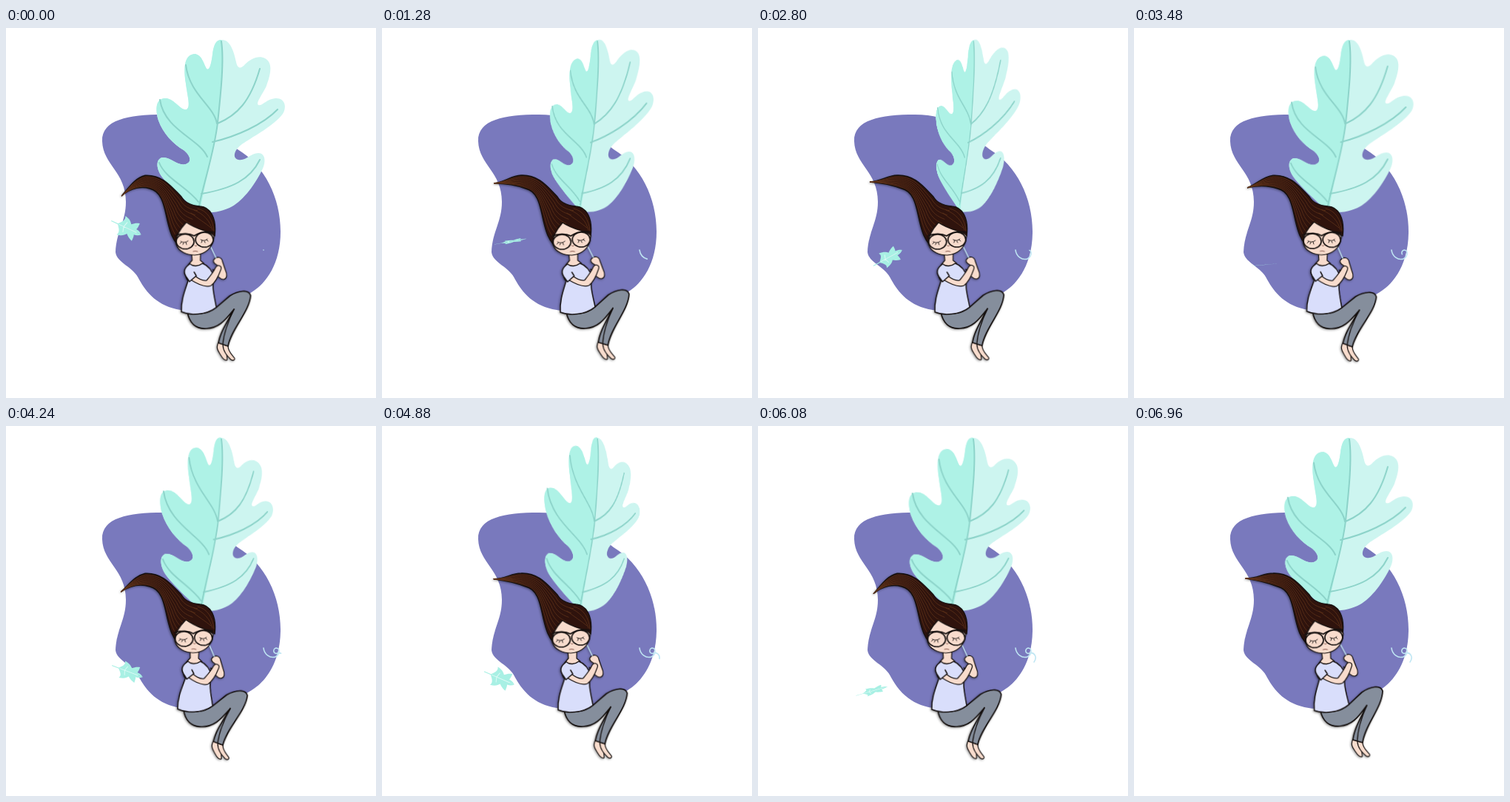
These frames come from a looping animation (500x500 px, 7 s). An HTML page:

```html
<!DOCTYPE html>
<html lang="en">
<head>
<meta charset="utf-8">
<title>Floating under a leaf</title>
<style>
html, body { margin: 0; width: 100%; height: 100%; overflow: hidden; background: #fff; }
#stage { position: relative; width: 100%; height: 100%; overflow: hidden; contain: strict; }
svg { position: absolute; left: 0; top: 0; width: 100%; height: 100%; }
#leaf { left: 195px; width: 190px; height: 260px; transform-origin: 97px 205px; }
path { stroke-linecap: round; stroke-linejoin: round; }
.line { fill: none; stroke: #15100f; stroke-width: 1.3; }
.skin { fill: #f8dccd; stroke: #15100f; stroke-width: 1.2; }
.shirt { fill: #d9defb; stroke: #15100f; stroke-width: 1.5; }
.pants { fill: #858e9c; stroke: #15100f; stroke-width: 1.7; }
.vein { fill: none; stroke: #8cd3c9; stroke-width: 2; }
.strand { fill: none; stroke: #5f331a; stroke-width: .8; }
#hair, #body { filter: drop-shadow(-1px 1px 1.5px #0006); }
</style>
</head>
<body>
<div id="stage">
<svg viewBox="0 0 500 500">
  <path fill="#7979bd" d="M130 153C129 124 165 117 212 117C262 117 282 140 313 164C350 186 371 230 371 275C371 318 352 345 332 357C300 378 265 386 236 381C205 376 190 358 180 340C172 322 150 318 148 303C149 275 162 262 162 235C162 194 131 185 130 153Z"/>
  <path id="swirl" fill="none" stroke="#bfe6f3" stroke-width="1.6" d="M348 300C349 309 357 314 364 312C370 309 371 300 365 300C360 301 361 309 367 307C373 305 378 312 373 319"/>
  <g id="drift" fill="#a8f0e4">
    <path fill="none" stroke="#a8f0e4" stroke-width="1.2" d="M-22 0H-8"/>
    <path id="half" d="M-13 0C-9 -5 -5 -9 -8 -14C-1 -13 2 -10 4 -7C7 -10 10 -12 14 -13C14 -9 14 -6 13 -4C17 -4 20 -2 22 0Z"/>
    <use href="#half" transform="scale(1 -1)"/>
    <path fill="none" stroke="#dcfaf5" d="M-11 0H15M-4 0L-2 -7M-4 0L-2 7"/>
  </g>
</svg>

<svg id="leaf" viewBox="195 0 190 260">
  <path id="whole" fill="#cdf5f0"/>
  <path id="left" fill="#aef2e6"/>
  <path class="vein" d="M291 18C295 45 290 90 286 128C281 170 268 205 261 240M285 129C281 105 248 90 243 50M272 174C262 150 214 138 208 97M260 235C245 215 215 203 207 182M286 129C312 118 330 100 343 55M279 154C310 147 347 131 367 110M264 224C305 217 330 205 343 178"/>
</svg>

<svg viewBox="0 0 500 500">
  <path id="hair" fill="#2f130d" stroke="#15100f" stroke-width="1.4"/>
  <path id="strands" class="strand"/>
  <path class="strand" d="M259 244C272 247 279 258 281 274M254 246C267 251 276 261 279 273M250 250C260 258 270 264 277 270"/>
  <g id="body">
    <path class="skin" d="M291 424C287 432 291 436 294 441C297 446 300 449 303 448C304 442 300 436 300 428Z"/>
    <path class="skin" d="M297 427C297 436 303 442 308 447C311 449 314 448 313 445C309 440 304 436 304 429Z"/>
    <path class="pants" d="M248 384C251 399 260 407 274 406C290 405 298 396 311 379C303 395 293 410 291 425L304 429C308 405 332 382 333 360C330 351 316 354 305 361C297 368 292 373 287 377C275 387 260 388 248 384Z"/>
    <path class="line" d="M311 379C304 394 298 409 297 426"/>
    <path class="skin" d="M252 304L253 314L248 320C256 326 263 324 269 318L264 314V304Z"/>
    <path class="skin" d="M281 326C286 334 291 339 296 339C301 338 301 332 298 326L294 315C293 309 286 307 282 313C280 318 287 319 289 322L288 328Z"/>
    <path class="shirt" d="M250 319C255 323 262 322 267 318C276 321 281 329 284 338C279 346 284 362 287 377C273 388 252 389 240 384C239 368 244 355 248 342C243 337 243 324 250 319Z"/>
    <path class="skin" d="M256 334C262 339 268 342 273 341C277 336 282 330 285 323C288 318 294 321 292 326C289 335 284 344 279 348C271 351 259 345 251 340Z"/>
    <path class="shirt" d="M250 319C243 324 241 330 245 336L250 343L259 335L256 330"/>
    <path fill="none" stroke="#bfe3ee" stroke-width="1.5" d="M278 296L285 310"/>
    <path class="skin" d="M244 263C236 272 229 282 231 293C234 303 246 307 256 307C270 306 281 297 282 281C280 275 260 274 244 263Z"/>
    <g class="line">
      <path stroke-width="1.8" d="M230 281C239 277 249 278 255 281C262 276 272 274 281 276"/>
      <ellipse cx="243" cy="289" rx="12" ry="10" stroke-width="1.7"/>
      <ellipse cx="269" cy="286" rx="12" ry="10" stroke-width="1.7"/>
      <path stroke-width=".9" d="M237 289Q242 292 247 288M238 290L236 292M241 291L240 293M244 290L245 293M264 286Q269 289 273 285M266 287L265 290M269 288L270 290M272 286L274 288"/>
      <path stroke="#8b5c50" stroke-width="1" d="M256 294Q258 296 259 294M254 302Q257 301 260 302"/>
    </g>
  </g>
</svg>
</div>

<script>
const LOOP = 7000, TAU = 2 * Math.PI;
const $ = id => document.getElementById(id);
const set = (id, name, value) => $(id).setAttribute(name, value);

const right = 'C303 15 308 32 311 46C313 56 318 55 323 49C330 42 341 36 350 41C361 47 358 62 352 78C348 88 337 101 341 104C346 106 352 96 364 95C377 94 380 107 374 116C362 132 335 146 322 155C308 163 305 176 314 178C325 180 330 169 341 169C351 169 352 182 345 194C335 214 318 236 302 243C290 248 280 250 262 250';
const rib = 'C295 45 290 90 286 128C281 170 268 210 262 250';
const left = 'C245 235 220 214 210 200C202 188 203 176 212 175C222 174 232 187 243 184C252 181 249 172 240 165C226 157 212 142 206 125C200 104 205 94 217 95C229 97 236 112 244 110C250 107 245 92 243 75C240 55 240 35 256 35C265 37 267 48 271 55C275 58 277 50 279 36C281 20 285 16 291 16Z';
set('whole', 'd', 'M291 16' + right + left);
set('left', 'd', 'M291 16' + rib + left);

// A cosine with its crest at `peak` ms
const wave = (t, period, peak = 0) => Math.cos(TAU * (t - peak) / period);

// Edges of the hair from the tip to the head
const upper = [[151, 206], [168, 206], [174, 199], [188, 199], [212, 198], [224, 215], [237, 228], [242, 237], [252, 240], [262, 241]];
const lower = [[151, 206], [170, 209], [184, 213], [194, 217], [212, 221], [214, 244], [218, 260], [222, 277], [225, 285], [232, 293]];

const curve = points => `M${points[0]}C${points.slice(1)}`;
const between = (a, b, p) => a.map(([x, y], i) => [x + (b[i][0] - x) * p, y + (b[i][1] - y) * p]);

function drawHair(low) {
  const sag = ([x, y]) => [x + 6 * low * (x < 160), y + 23 * low * (Math.max(0, 193 - x) / 42) ** 2];
  const up = upper.map(sag), down = lower.map(sag);
  const crown = 'C276 242 285 256 282 281C272 274 255 273 246 264L232 293';
  set('hair', 'd', curve(up) + crown + 'C' + [...down].reverse().slice(1) + 'Z');
  let d = '';
  for (let k = 1; k < 9; k++) d += curve(between(up, down, k / 9));
  set('strands', 'd', d);
}

function drawDrift(t) {
  const x = 165.5 + 11.5 * wave(t, 7600, 2200), y = 270 + .0145 * t;
  const tumble = wave(t, 4640);
  set('drift', 'transform', `translate(${x} ${y}) rotate(${30 * tumble - 5}) scale(1 ${tumble})`);
  set('drift', 'opacity', Math.max(0, Math.min(1, (6500 - t) / 400)));
}

function draw() {
  const t = performance.now() % LOOP, a = TAU * t / LOOP;
  const turn = 46 * Math.sin(a) - 12 * Math.sin(2 * a) + 6 * (1 - Math.cos(a));
  $('leaf').style.transform = `perspective(560px) rotateY(${-turn}deg)`;
  const lean = 1.2 - 1.5 * wave(t, LOOP, 580) - 1.5 * wave(t, 2030, 6960);
  set('body', 'transform', `rotate(${lean} 262 250)`);
  drawHair(.45 + .45 * wave(t, 2000));
  set('swirl', 'stroke-dasharray', `${t / 76 + .01} 200`);
  drawDrift(t);
  requestAnimationFrame(draw);
}
draw();
</script>
</body>
</html>
```
